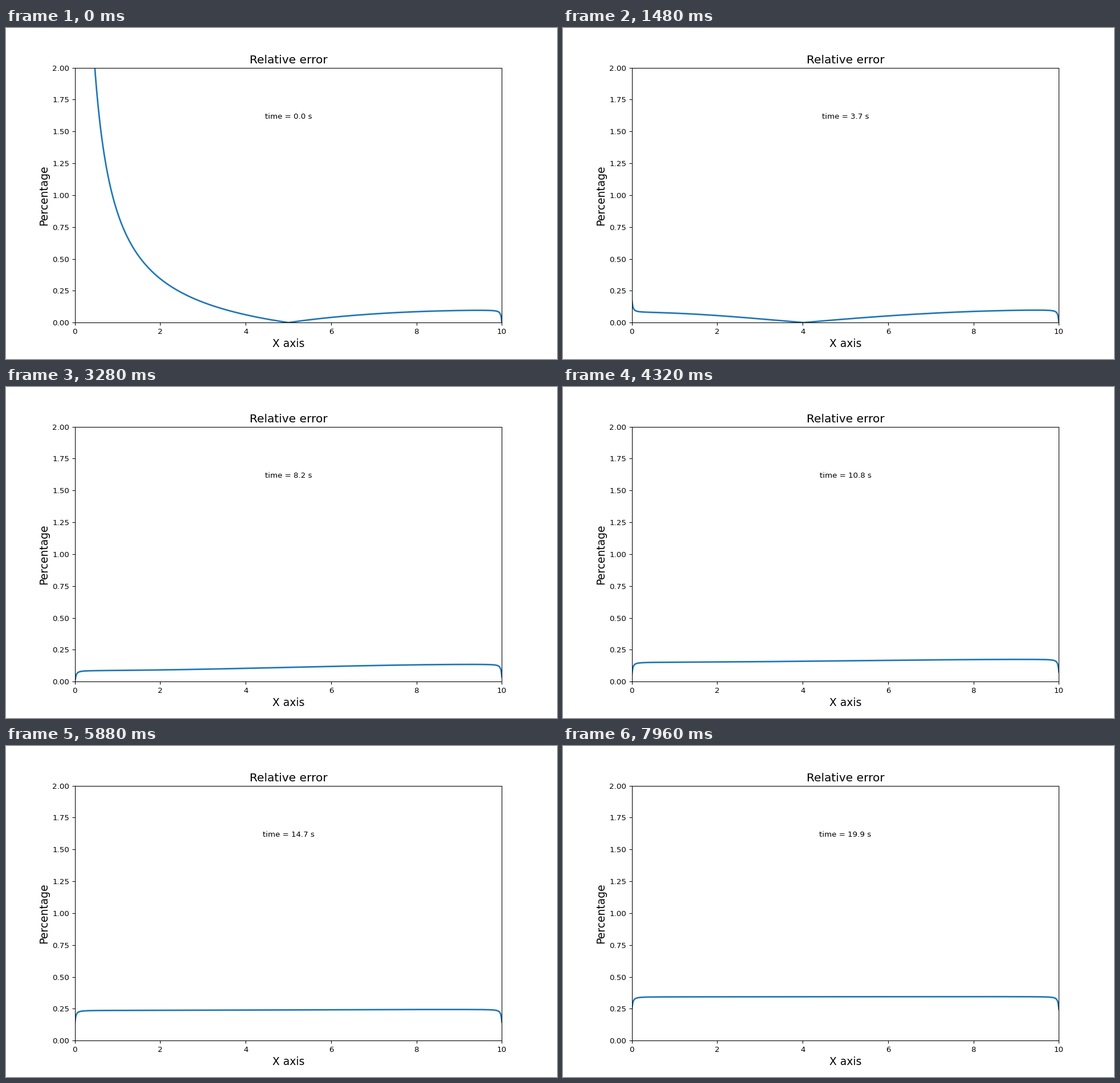
Write a matplotlib script that moves like this. It is 966 px wide and 580 px high and loops after 8 s.

```python
import numpy as np
import matplotlib.pyplot as plt
from matplotlib.animation import FuncAnimation

L = 10.0                      # rod length
RATE = 3 * (np.pi / L) ** 2   # decay rate of the first cosine mode
FRAMES, DT = 200, 0.1

x = np.linspace(0, L, 1001)
odd = np.arange(1, 400, 2)
kappa = odd * np.pi / L
modes = np.cos(np.outer(x, kappa))

# cosine coefficients of s and s**3 with s = 5 - x
ramp = 0.4 / kappa**2
cubic = 30 / kappa**2 - 2.4 / kappa**4
start = 0.247 * ramp - 0.002 * cubic

# thin dip at both ends of the rod
dip = sum(0.1 / (1 + (s / 0.02) ** 1.3) for s in (x, L - x))


def relative_error(t):
    decay = np.exp(-RATE * odd**2 * t)
    field = 5 - modes @ (ramp * decay)

    amp = start * decay
    amp[0] += (0.09 * t + 0.25 * (1 - np.exp(-0.3 * t))) * decay[0]
    mean = 0.0995 * t - 0.258 * (1 - np.exp(-0.47 * t))
    second = 0.05 * (np.exp(-RATE * t) - np.exp(-4 * RATE * t))
    error = mean - modes @ amp + second * np.cos(2 * np.pi * x / L)
    return np.abs(error / np.maximum(field, 1e-3) - dip)


# 966 x 580 pixels; the tiny excess guards against rounding down
fig, ax = plt.subplots(figsize=(10.0001, 6.0042), dpi=96.6)
ax.set_xlim(0, L)
ax.set_ylim(0, 2)
ax.set_title("Relative error", fontsize=15)
ax.set_xlabel("X axis", fontsize=14)
ax.set_ylabel("Percentage", fontsize=14)
line, = ax.plot([], [], lw=2, color="#1f77b4")
label = ax.text(5, 1.6, "", ha="center")


def update(frame):
    t = frame * DT
    line.set_data(x, relative_error(t))
    label.set_text(f"time = {t:.1f} s")
    return line, label


anim = FuncAnimation(fig, update, frames=FRAMES, interval=40,
                     repeat=True, repeat_delay=0)
plt.show()
```
